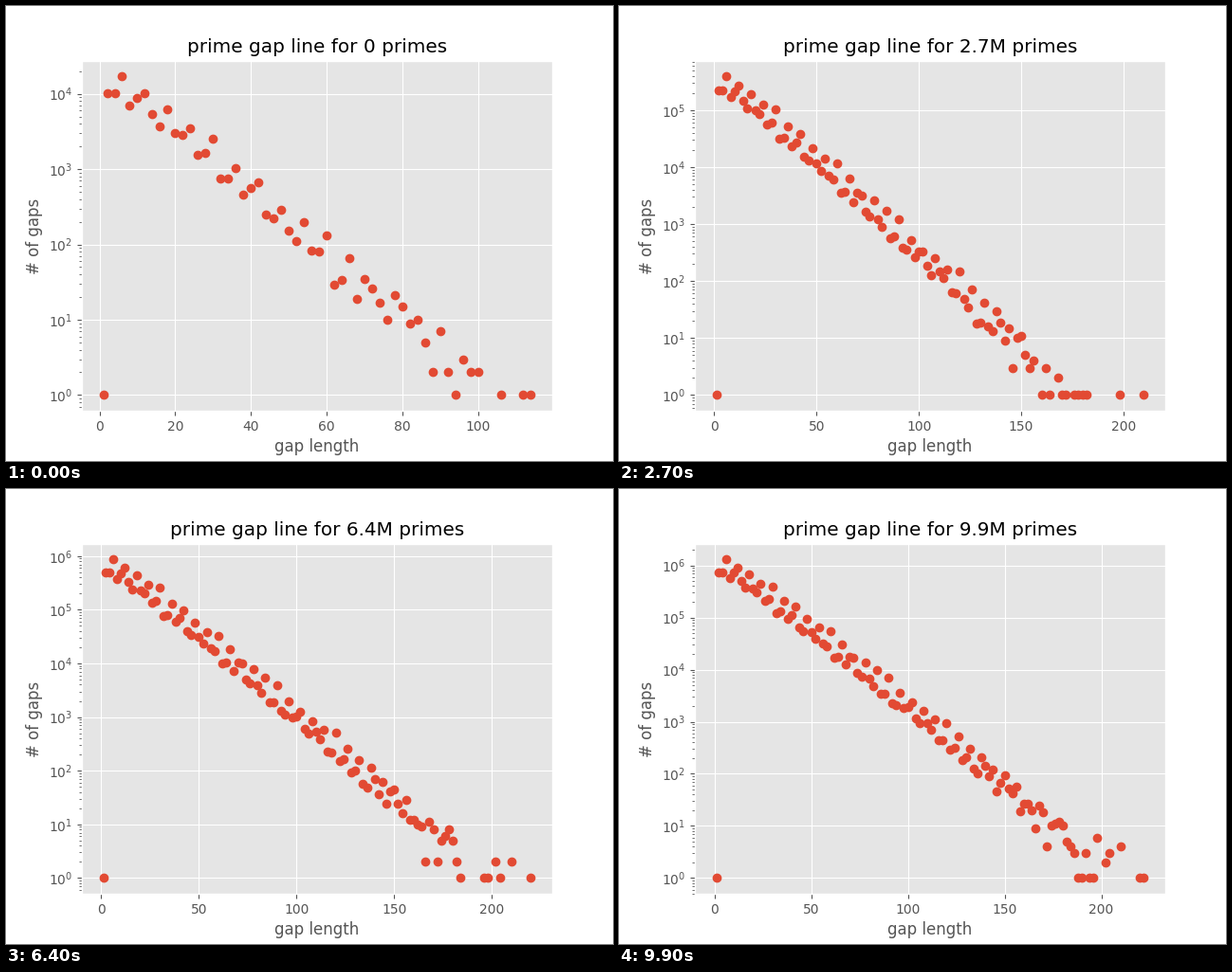
Recreate the animation shown at these times as a matplotlib script. Size 640x480 px, loop 10000 ms.

```python
import numpy as np
import matplotlib.pyplot as plt
from matplotlib.animation import FuncAnimation

FRAMES = 100
STEP = 100_000          # primes added per frame
LIMIT = 179_424_700     # just above the last prime needed


def prime_gaps(limit, count):
    """First `count` gaps between consecutive primes, using an odd-only sieve."""
    odd = np.ones(limit // 2, dtype=bool)   # odd[i] stands for 2i + 1
    for i in range(1, int(limit ** 0.5) // 2 + 1):
        if odd[i]:
            odd[2 * i * (i + 1)::2 * i + 1] = False
    # Slot 0 (the number 1) takes the place of the prime 2.
    gaps = 2 * np.diff(np.flatnonzero(odd).astype(np.int32))[:count]
    gaps[0] = 1
    return gaps


def short_number(n):
    for size, suffix in ((1_000_000, "M"), (1_000, "K")):
        if n >= size:
            return f"{n / size:g}{suffix}"
    return str(n)


gaps = prime_gaps(LIMIT, FRAMES * STEP).reshape(FRAMES, STEP)
longest = gaps.max()
counts = np.cumsum([np.bincount(g, minlength=longest + 1) for g in gaps], axis=0)

plt.style.use("ggplot")
fig, ax = plt.subplots(figsize=(6.4, 4.8), dpi=100)
ax.set_yscale("log")
ax.set_xlabel("gap length")
ax.set_ylabel("# of gaps")
title = ax.set_title("")
dots, = ax.plot([1], [1], "o")


def update(frame):
    lengths = np.flatnonzero(counts[frame])
    dots.set_data(lengths, counts[frame, lengths])
    title.set_text(f"prime gap line for {short_number(frame * STEP)} primes")
    ax.relim()
    ax.autoscale_view()
    return dots, title


anim = FuncAnimation(fig, update, frames=FRAMES, interval=100,
                     repeat=True, repeat_delay=0, blit=False)
plt.show()
```
